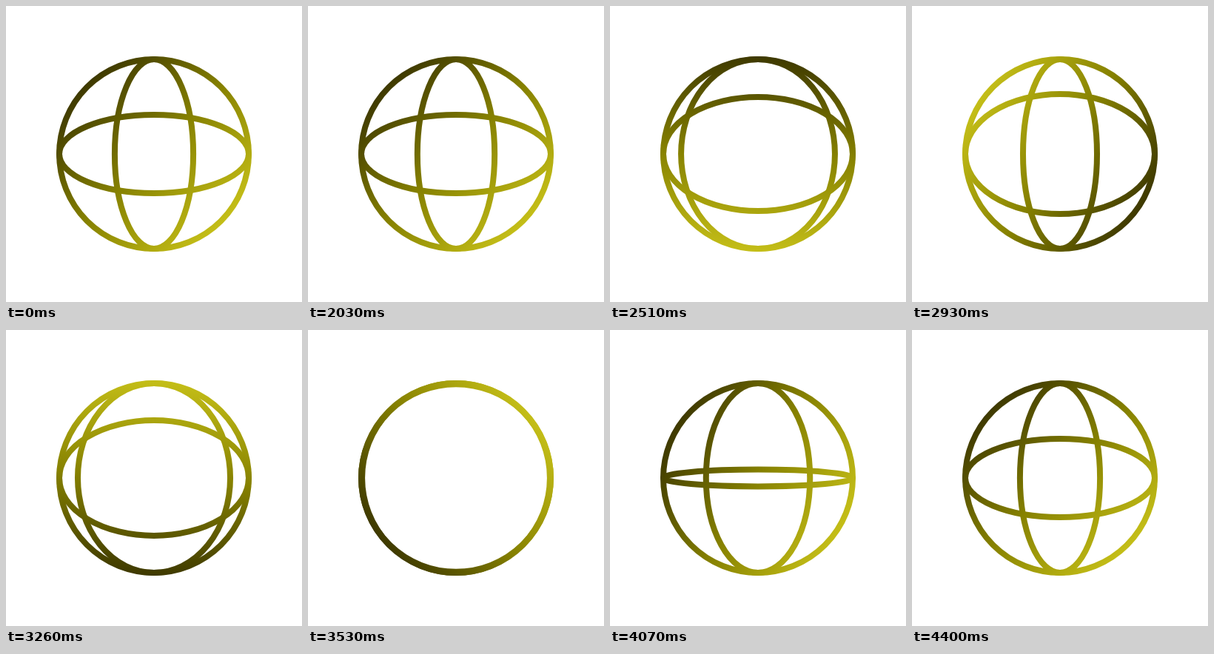
An HTML page with a canvas for the animation above (4.49 s loop, 400 by 400 pixels).

```html
<!DOCTYPE html>
<html lang="en">
<head>
<meta charset="utf-8">
<title>Spinning globe</title>
<style>
  html, body { margin: 0; width: 100%; height: 100%; overflow: hidden; background: #fff; }
  canvas { display: block; width: 400px; height: 400px; }
</style>
</head>
<body>
<canvas id="stage" width="400" height="400"></canvas>
<script>
const ctx = document.getElementById("stage").getContext("2d");
const LOOP = 4490, REST = 2000, SPIN = 2400, STEP = 30;
const CENTER = 200, RADIUS = 128;

// Smooth monotone curve through [ms, degrees] keys, at rest on both ends.
function curve(keys) {
  const rates = keys.slice(1).map(([t, v], i) => (v - keys[i][1]) / (t - keys[i][0]));
  const slopes = keys.map(([t], i) => {
    if (i === 0 || i === keys.length - 1) return 0;
    const before = t - keys[i - 1][0], after = keys[i + 1][0] - t;
    const a = rates[i - 1], b = rates[i];
    const mean = (a * after + b * before) / (before + after);
    const limit = 3 * Math.min(Math.abs(a), Math.abs(b));
    return Math.sign(mean) * Math.min(Math.abs(mean), limit);
  });
  return time => {
    if (time <= keys[0][0]) return keys[0][1];
    let i = 0;
    while (i < keys.length - 2 && time > keys[i + 1][0]) i++;
    const [t0, v0] = keys[i], [t1, v1] = keys[i + 1];
    const h = t1 - t0, s = Math.min((time - t0) / h, 1), r = 1 - s;
    return v0 * (1 + 2 * s) * r * r + v1 * s * s * (3 - 2 * s)
      + h * s * r * (slopes[i] * r - slopes[i + 1] * s);
  };
}

const turn = curve([[0, 24.5], [510, -54.3], [930, -157], [1260, -233.6], [1830, -310], [2400, -335]]);
const tilt = curve([[200, 24.5], [510, 37], [930, 140.7], [1260, 217.5], [1830, 334], [2400, 384.5]]);
const shade = curve([[0, 225], [510, 272], [930, 393], [1260, 454], [1830, 546], [2400, 585]]);

const radians = degrees => degrees * Math.PI / 180;
const foreshorten = degrees => RADIUS * Math.abs(Math.sin(radians(degrees)));

function ring(rx, ry) {
  ctx.beginPath();
  ctx.ellipse(CENTER, CENTER, rx, ry, 0, 0, 2 * Math.PI);
  ctx.stroke();
}

function shading(degrees) {
  const dx = 132 * Math.cos(radians(degrees)), dy = 132 * Math.sin(radians(degrees));
  const fill = ctx.createLinearGradient(CENTER + dx, CENTER + dy, CENTER - dx, CENTER - dy);
  fill.addColorStop(0, "#3e3900");
  fill.addColorStop(0.5, "#868100");
  fill.addColorStop(1, "#c4be18");
  return fill;
}

function draw(now) {
  const spin = Math.min(Math.max(now % LOOP - REST, 0), SPIN);
  const time = Math.floor(spin / STEP) * STEP;
  ctx.fillStyle = "#fff";
  ctx.fillRect(0, 0, 400, 400);
  ctx.lineWidth = 8;
  ctx.strokeStyle = shading(shade(time));
  ring(RADIUS, RADIUS);
  ring(foreshorten(turn(time)), RADIUS);
  ring(RADIUS, foreshorten(tilt(time)));
}

const start = performance.now();
function tick() {
  draw(performance.now() - start);
  requestAnimationFrame(tick);
}
tick();
</script>
</body>
</html>
```
